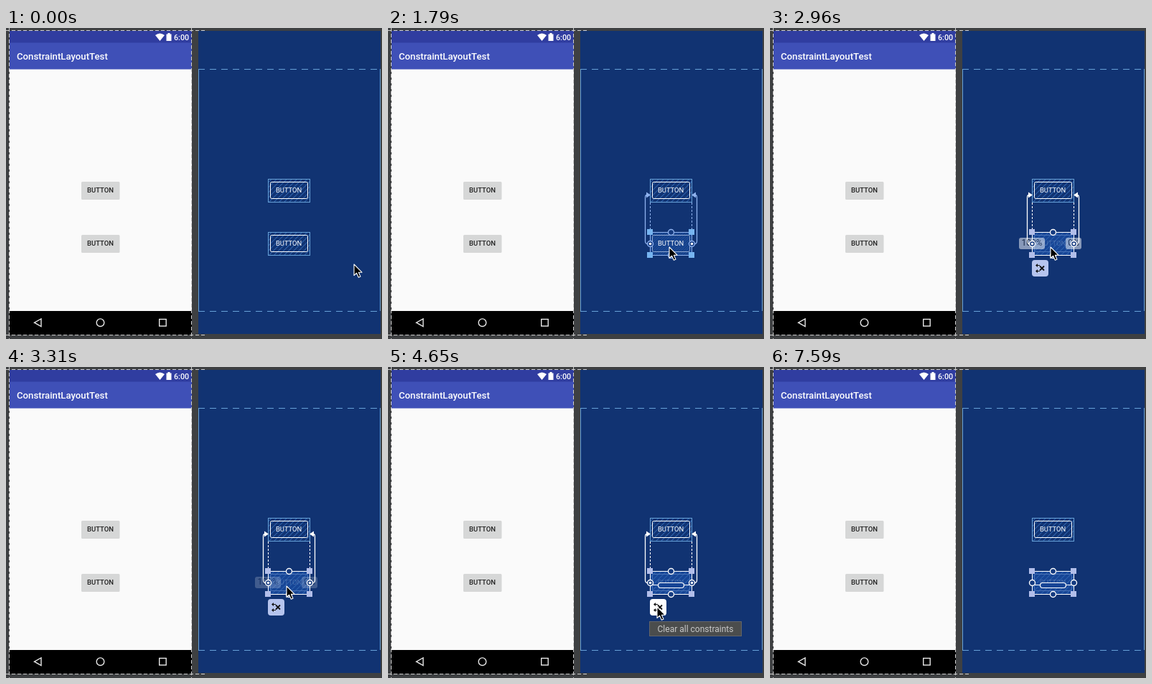
Animation, 524 px wide and 433 px high, one loop 8.57 s. Source, as an HTML page:

```html
<!DOCTYPE html>
<html lang="en">
<head>
<meta charset="utf-8">
<title>Clearing constraints</title>
<style>
html, body { margin: 0; width: 100%; height: 100%; overflow: hidden; background: #3e4042; }
svg { display: block; width: 524px; height: 433px; }
text { font-family: Roboto, "Liberation Sans", sans-serif; }
.medium { font-weight: 500; }
.line { fill: none; stroke: currentColor; }
.frame { fill: none; stroke: #67a1d8; }
.anchor { fill: #143a80; stroke: currentColor; stroke-width: 1.4; }
</style>
</head>
<body>
<svg viewBox="0 0 524 433">
  <defs>
    <pattern id="hatch" width="5" height="5" patternUnits="userSpaceOnUse" patternTransform="rotate(45)">
      <path d="M.5 0V5" stroke="#2c62ad" stroke-width="1"/>
    </pattern>
    <g id="outline">
      <rect class="frame" x="365.5" y="210.5" width="58" height="32"/>
      <rect x="366" y="211" width="57" height="31" fill="url(#hatch)"/>
      <rect x="368.5" y="214.5" width="52" height="23" rx="2" fill="none" stroke="#fff"/>
    </g>
    <g id="side" class="line">
      <path d="M362 300.5Q358.5 300.5 358.5 297V236Q358.5 232.5 361 232.5" stroke-width="1.3"/>
      <path d="M360 228.5L366 232.5L360 236.5Z" fill="currentColor" stroke="none"/>
      <path d="M365.5 243V284" stroke-dasharray="3 2"/>
    </g>
  </defs>

  <rect width="524" height="433" fill="#3e4042"/>

  <!-- device preview -->
  <rect x="5" y="4" width="254" height="423" fill="#fafafa"/>
  <rect x="5" y="4" width="254" height="17" fill="#303da0"/>
  <rect x="5" y="20.5" width="254" height="37" fill="#3f50b7"/>
  <rect x="5" y="394" width="254" height="33" fill="#000"/>
  <path d="M208 10Q214.500 5 221 10L214.500 18Z" fill="#fff"/>
  <path d="M223.500 8.500H225.500V7H228.500V8.500H230.500V18H223.500Z" fill="#fff"/>
  <text class="medium" x="234" y="17" font-size="10.700" fill="#fff">6:00</text>
  <text id="tick" x="250" y="12.500" font-size="6" fill="#fff">0</text>
  <text class="medium" x="15" y="44" font-size="13.200" fill="#fff">ConstraintLayoutTest</text>
  <g font-size="9.500" fill="#202020" class="medium">
    <rect x="105" y="214" width="53.500" height="25" rx="1.500" fill="#d6d7d7"/>
    <text x="113" y="229.300">BUTTON</text>
    <rect x="105" y="288" width="53.500" height="25" rx="1.500" fill="#d6d7d7"/>
    <text x="113" y="303.300">BUTTON</text>
  </g>
  <g fill="none" stroke="#e8e8e8" stroke-width="1.400">
    <path d="M49 405V415.500L39.500 410.200Z"/>
    <circle cx="131.500" cy="410.200" r="5.300"/>
    <rect x="213.700" y="405.500" width="9.500" height="9.500"/>
  </g>
  <g stroke="#d0d0d0" stroke-dasharray="5 3">
    <path d="M0 3.500H278M0 427.500H278M4.500 0V433M258.500 0V433"/>
  </g>

  <!-- blueprint -->
  <rect x="268" y="4" width="254" height="422" fill="#113372"/>
  <path class="frame" d="M268.500 57V394M521.500 57V394"/>
  <path class="frame" d="M268 57.500H522M268 394.500H522" stroke-dasharray="9 7"/>
  <use href="#outline"/>
  <text x="376" y="229.300" font-size="9.400" fill="#fff">BUTTON</text>
  <g id="lower">
    <use href="#outline" y="74"/>
  </g>
  <g id="glow">
    <rect x="365" y="284" width="59" height="33" fill="#174596"/>
    <rect x="365" y="284" width="59" height="33" fill="url(#hatch)"/>
    <rect x="368.500" y="288.500" width="52" height="23" rx="2" fill="none" stroke="#4770b5"/>
  </g>
  <text id="label" x="376" y="303.300" font-size="9.400" fill="#fff">BUTTON</text>

  <g id="links">
    <use href="#side"/>
    <use href="#side" transform="translate(789 0) scale(-1 1)"/>
  </g>
  <g id="bias" font-size="12" fill="#222" text-anchor="middle">
    <rect x="347" y="292" width="36" height="16" rx="3" fill="#fff"/>
    <rect x="412" y="292" width="22" height="16" rx="3" fill="#fff"/>
    <text x="365" y="302.500">100%</text>
    <text x="423" y="302.500">0%</text>
  </g>
  <g id="base" fill="none" stroke="#fff">
    <path id="wire" d="M369 303.500H376M413 303.500H420"/>
    <rect id="pill" x="376.500" y="300.500" width="36" height="7" rx="3.500" fill="#174596" stroke-width="1.200"/>
  </g>
  <g id="handles">
    <rect class="line" x="365.500" y="284.500" width="58" height="32"/>
    <g id="corners" fill="currentColor">
      <rect x="361" y="280" width="8" height="8"/>
      <rect x="419" y="280" width="8" height="8"/>
      <rect x="361" y="312" width="8" height="8"/>
      <rect x="419" y="312" width="8" height="8"/>
    </g>
    <g id="anchors">
      <circle class="anchor" cx="394.500" cy="284.500" r="4"/>
      <circle class="anchor" cx="394.500" cy="316.500" r="4"/>
      <circle class="anchor" cx="365.500" cy="300.500" r="4"/>
      <circle class="anchor" cx="423.500" cy="300.500" r="4"/>
    </g>
    <g id="dots" fill="#fff">
      <circle cx="365.500" cy="300.500" r="1.800"/>
      <circle cx="423.500" cy="300.500" r="1.800"/>
    </g>
  </g>
  <g id="action">
    <rect id="plate" x="365" y="323" width="23" height="23" rx="4"/>
    <path d="M376 331.500L382 337.500M382 331.500L376 337.500" stroke="#111" stroke-width="1.800"/>
    <path d="M370 330.500L373 328V333ZM376 330H373V331H376ZM370 338.500L373 336V341ZM376 338H373V339H376Z" fill="#111"/>
  </g>
  <g id="tip">
    <rect x="364.500" y="354.500" width="128" height="20" fill="#4b4d4d" stroke="#636569"/>
    <text x="428.500" y="368.500" font-size="12" fill="#c8c8c8" text-anchor="middle">Clear all constraints</text>
  </g>
  <path id="cursor" d="M0 0V15.500L3.600 12.200L6.300 18.300L9 17.100L6.400 11.200H11Z" fill="#000" stroke="#fff" stroke-width="1.100" stroke-linejoin="round"/>
</svg>
<script>
const LOOP = 8570, STEP = 90;
const HOVER = 1520, SELECT = 2510, CLEAR = 6000;

// time, x, y of the pointer; each place holds until the next
const path = [
  [0, 485, 329], [1440, 441, 320], [1520, 415, 312], [1610, 402, 308],
  [1700, 395, 306], [1790, 392, 305], [1880, 391, 305],
  [3400, 390, 308], [3490, 389, 314], [3580, 387, 321], [3670, 386, 326],
  [3760, 385, 328], [3850, 383, 329], [3940, 380, 330], [4030, 378, 330],
  [4120, 376, 330], [4210, 375, 331], [4560, 375, 334],
  [7240, 384, 345], [7330, 410, 372], [7410, 440, 400], [7500, 467, 424],
  [7590, 540, 450]
];

const el = id => document.getElementById(id);
const show = (id, opacity) => { el(id).style.opacity = opacity; };
const clamp = v => Math.min(1, Math.max(0, v));
const mix = (a, b, k) => `rgb(${a.map((v, i) => Math.round(v + (b[i] - v) * k))})`;

// progress from start to end, advancing in even steps
function ramp(t, start, end) {
  const stepped = start + Math.floor((t - start + 1) / STEP) * STEP;
  return clamp((stepped - start) / (end - start));
}

function draw(t) {
  const selected = t >= SELECT;
  const linked = t < CLEAR;
  const hover = t < HOVER ? 0 : clamp(0.25 + ramp(t, HOVER, 1880));
  const settle = ramp(t, SELECT, 2960);
  const fade = ramp(t, SELECT, 3410);

  const [, x, y] = path.filter(p => p[0] <= t).pop();
  el("cursor").setAttribute("transform", `translate(${x} ${y})`);

  show("lower", selected ? 1 - 0.8 * settle : 1);
  show("glow", hover * (selected ? 1 : 0.6));
  show("label", selected ? 0.65 - 0.45 * settle : 1);
  show("links", linked ? hover : 0);
  show("handles", hover);
  show("dots", linked ? 1 : 0);
  show("bias", selected ? 1 - fade : 0);
  show("wire", ramp(t, 3400, 3760));
  show("pill", ramp(t, 3400, 4380));
  show("action", selected && linked ? 1 : 0);
  show("tip", linked ? (t >= 4650 ? 1 : t >= 4560 ? 0.5 : 0) : 0);
  show("tick", t >= CLEAR && t < 6090 ? 0.8 : 0);

  const lineTone = selected ? mix([176, 188, 240], [255, 255, 255], settle) : "#8fb2ee";
  el("links").style.color = lineTone;
  el("handles").style.color = lineTone;
  el("anchors").style.color = lineTone;
  el("corners").style.color = mix([118, 180, 240], [178, 190, 234], settle);
  el("plate").setAttribute("fill", t >= 3670 ? "#fff" : "#b6c4ee");
}

const begin = performance.now();
function tick() {
  draw((performance.now() - begin) % LOOP);
  requestAnimationFrame(tick);
}
draw(0);
requestAnimationFrame(tick);
</script>
</body>
</html>
```
